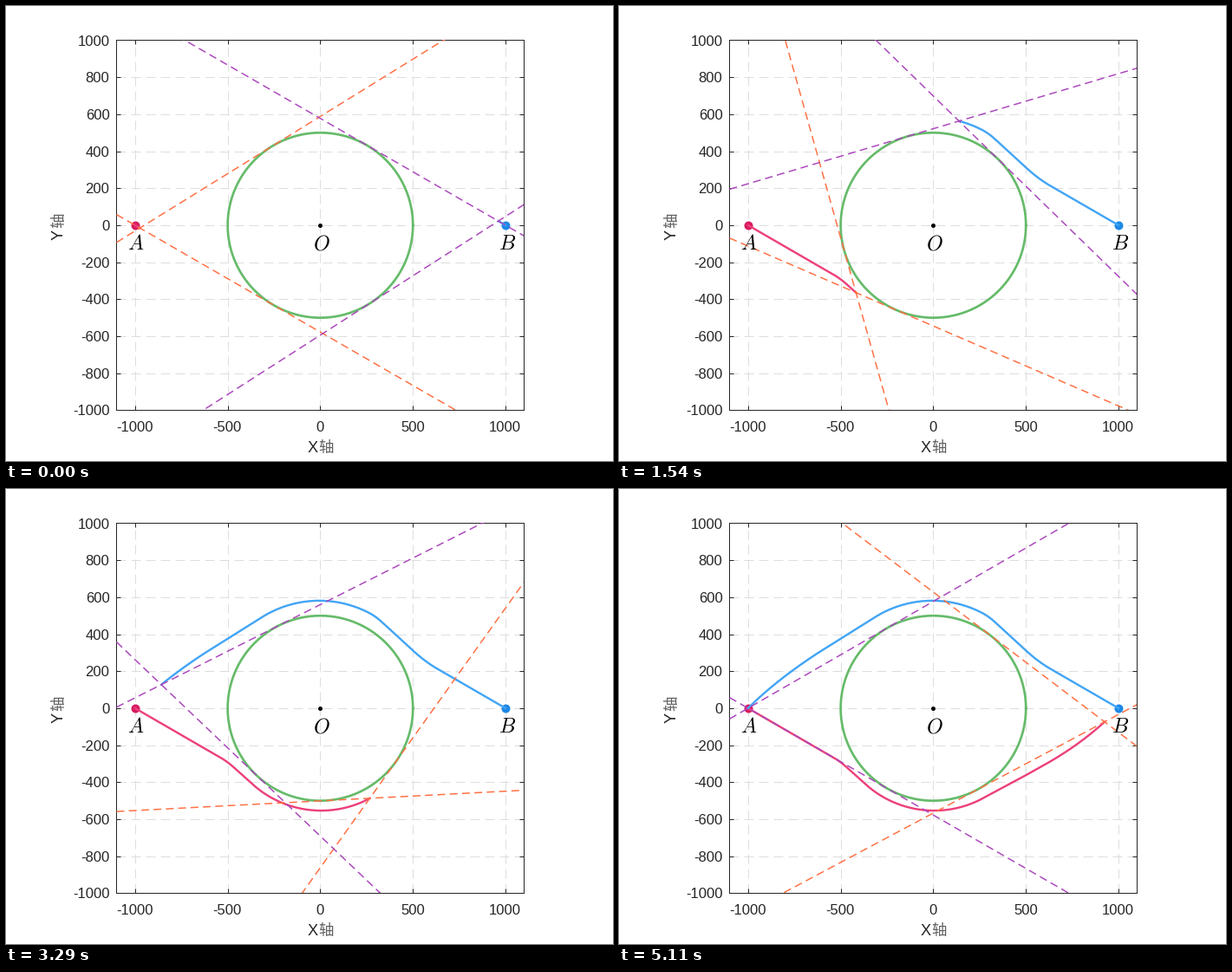
These frames come from a looping animation (700x525 px, 5180 ms). A matplotlib script:

```python
import numpy as np
import matplotlib.pyplot as plt
from matplotlib.animation import FuncAnimation

W, H, DPI = 700, 525, 100
FRAMES, INTERVAL = 74, 70
R = 500
INK = "#262626"
# axes box in pixels, just under the half so the frame snaps to whole pixels
LEFT, RIGHT, TOP, BOTTOM = 127.45, 597.45, 39.45, 466.45

plt.rcParams["font.family"] = ["Liberation Sans", "Noto Sans CJK JP"]
plt.rcParams["mathtext.fontset"] = "cm"


def pt(px):
    """Pixels to points."""
    return px * 72 / DPI


# ---- path pieces -------------------------------------------------------
def line(p, q):
    t = np.linspace(0, 1, 60)[:, None]
    return (1 - t) * np.array(p) + t * np.array(q)


def bend(p, c, q):
    t = np.linspace(0, 1, 80)[:, None]
    p, c, q = map(np.array, (p, c, q))
    return (1 - t) ** 2 * p + 2 * t * (1 - t) * c + t ** 2 * q


def arc(a0, a1, r0, r1):
    a = np.radians(np.linspace(a0, a1, 160))
    r = np.linspace(r0, r1, 160)
    return np.column_stack([r * np.cos(a), r * np.sin(a)])


class Walker:
    def __init__(self, pieces, step):
        self.pts = np.vstack(pieces)
        gaps = np.hypot(*np.diff(self.pts, axis=0).T)
        self.s = np.concatenate([[0], np.cumsum(gaps)])
        self.step = step

    def trail(self, k):
        s = min(self.step * (k + 1), self.s[-1])
        tip = [np.interp(s, self.s, self.pts[:, i]) for i in (0, 1)]
        return np.vstack([self.pts[self.s < s], tip])


walk_a = Walker([
    line((-1000, 0), (-544, -263.5)),
    bend((-544, -263.5), (-505, -286), (-471, -316)),
    arc(228.5, 298, 550, 555.5),
    line((261, -490), (480, -373)),
    line((480, -373), (600, -306)),
    bend((600, -306), (833, -175), (1000, 0)),
], 29.96)

walk_b = Walker([
    line((1000, 0), (640, 207.8)),
    bend((640, 207.8), (567.4, 250), (505.5, 307)),
    line((505.5, 307), (329, 469)),
    bend((329, 469), (295, 500), (254, 520)),
    arc(64, 120.6, 578.7, 584),
    line((-297.5, 502.7), (-601.5, 312.4)),
    bend((-601.5, 312.4), (-843, 157), (-1000, 0)),
], 45.08)


def tangents(p):
    """Both tangent lines from p to the circle, across the x range."""
    d = np.hypot(*p)
    base = np.arctan2(-p[1], -p[0])
    half = np.arcsin(R / d)
    xs = np.array([-1100, 1100])
    for a in (base + half, base - half):
        c = np.cos(a)
        if abs(c) < 1e-4:
            c = 1e-4
        yield xs, p[1] + np.sin(a) / c * (xs - p[0])


# ---- stage -------------------------------------------------------------
fig = plt.figure(figsize=(W / DPI, H / DPI), dpi=DPI, facecolor="white")
ax = fig.add_axes([LEFT / W, 1 - BOTTOM / H,
                   (RIGHT - LEFT) / W, (BOTTOM - TOP) / H])
ax.set(xlim=(-1100, 1100), ylim=(-1000, 1000))
xticks, yticks = range(-1000, 1001, 500), range(-1000, 1001, 200)
ax.set_xticks(xticks)
ax.set_yticks(yticks)
ax.tick_params(direction="in", length=pt(4.7), width=pt(1), color=INK,
               top=True, right=True, labelbottom=False, labelleft=False)
for side in ax.spines.values():
    side.set(color=INK, linewidth=pt(1))
ax.set_axisbelow(True)
ax.grid(color="#dedede", linewidth=pt(1), linestyle=(0, (11, 6)))


def label(x, y, s, px=16.67, color=INK, **kw):
    opts = dict(ha="center", va="baseline")
    opts.update(kw)
    fig.text(x / W, 1 - y / H, s, fontsize=pt(px), color=color, **opts)


for v in xticks:
    label(362 + v * (RIGHT - LEFT) / 2200, 491, str(v))
for v in yticks:
    label(119.4, 259 - v * (BOTTOM - TOP) / 2000, str(v), ha="right")

label(353.5, 515, "X", 18.3)
label(369, 515, "轴", 17.5, "#606060")
label(61, 263.5, "Y", 18.3, rotation=90, va="center")
label(61, 247.5, "轴", 17.5, "#606060", rotation=90, va="center")

for x, s in ((150, "A"), (363.5, "O"), (578.5, "B")):
    label(x, 281, f"${s}$", 24, "black")

ring = np.linspace(0, 2 * np.pi, 361)
ax.plot(R * np.cos(ring), R * np.sin(ring), color="#66BB6A", lw=pt(2.7), zorder=3)
for x, color, size in ((-1000, "#D81B60", 10), (1000, "#1E88E5", 10), (0, "black", 5)):
    ax.plot(x, 0, "o", color=color, ms=pt(size), mew=0, zorder=3.5)


def actor(walker, color, ray_color):
    path, = ax.plot([], [], color=color, lw=pt(2.4), zorder=4)
    rays = [ax.plot([], [], color=ray_color, lw=pt(1.5), zorder=5,
                    linestyle=(0, (6, 3.5)), dash_capstyle="butt")[0]
            for _ in range(2)]
    return walker, path, rays


actors = [actor(walk_a, "#EC407A", "#FF7043"),
          actor(walk_b, "#42A5F5", "#AB47BC")]


def draw(k):
    changed = []
    for walker, path, rays in actors:
        trail = walker.trail(k)
        path.set_data(trail[:, 0], trail[:, 1])
        for ray, (xs, ys) in zip(rays, tangents(trail[-1])):
            ray.set_data(xs, ys)
        changed += [path, *rays]
    return changed


anim = FuncAnimation(fig, draw, frames=FRAMES, interval=INTERVAL,
                     init_func=lambda: draw(0), repeat=True, repeat_delay=0)
plt.show()
```
